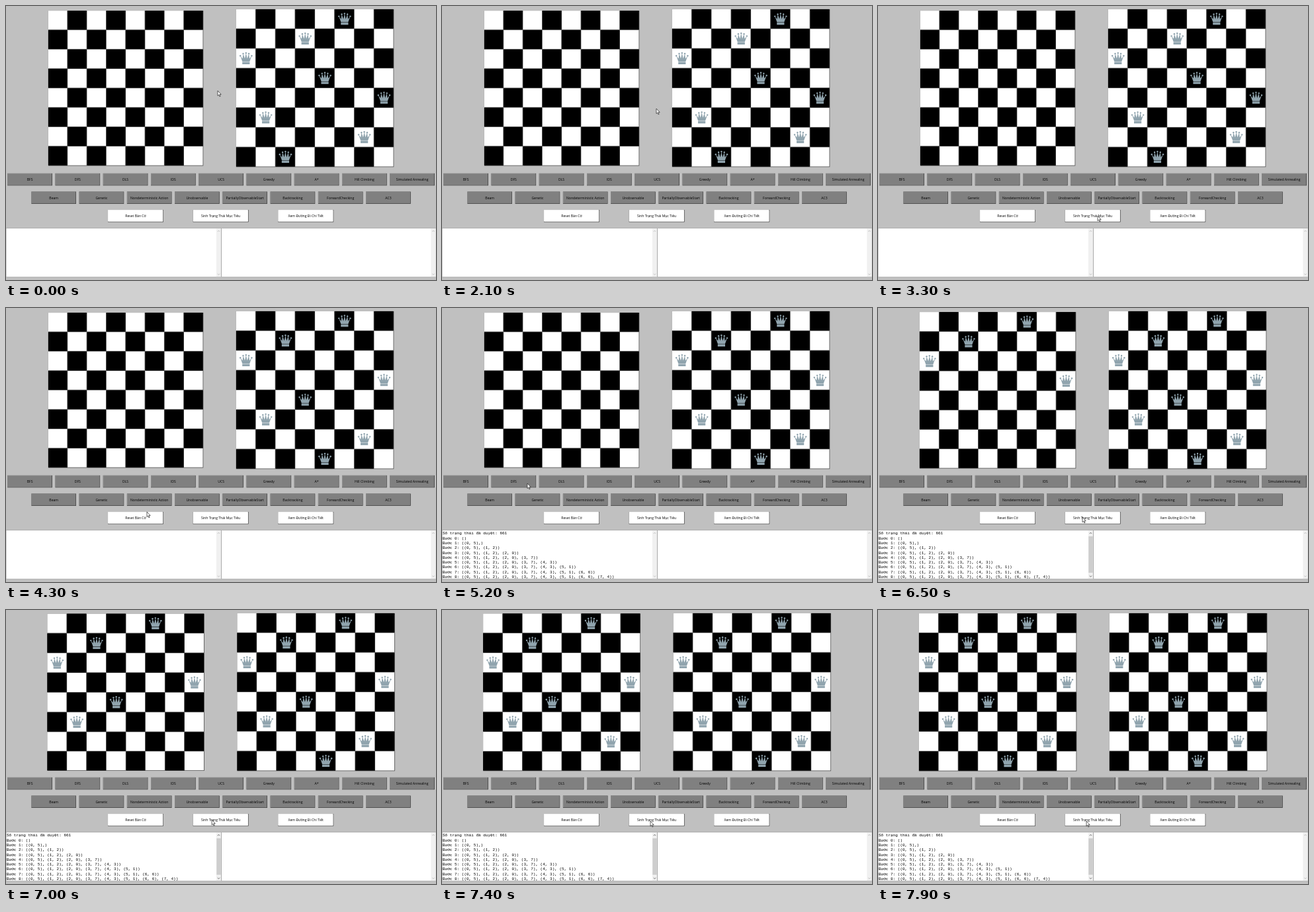
Recreate the animation shown at these times as an HTML page. Size 650 by 414 pixels, loop 8000 ms.

```html
<!DOCTYPE html>
<html lang="vi">
<head>
<meta charset="utf-8">
<title>Eight queens</title>
<style>
html, body { margin: 0; width: 100%; height: 100%; overflow: hidden; background: #c0c0c0; }
svg { display: block; width: 100vw; height: 100vh; }
.label { font-family: "Open Sans", "Noto Sans", sans-serif; font-size: 5.1px; text-anchor: middle; }
.log { font-family: "Liberation Mono", monospace; font-size: 6px; white-space: pre; }
</style>
</head>
<body>
<svg id="stage" viewBox="0 0 650 414">
  <defs>
    <g id="queen" fill="#90a4ae"></g>
  </defs>
  <g id="ui"></g>
  <g id="boards"></g>
  <path id="cursor" d="M0 0V7.6L1.7 6.1L2.9 8.8L4.1 8.3L2.9 5.6H5.2Z" fill="#fff" stroke="#222" stroke-width=".7" stroke-linejoin="round"/>
</svg>
<script>
const NS = "http://www.w3.org/2000/svg";
const LOOP = 8000, STEP = 100;
const TARGET_AT = 3400, LOG_AT = 5200, FIRST_QUEEN = 5450, QUEEN_GAP = 310;
const BASE = 29.3, WIDE = 29.8, EDGE = .8;

// column of the queen in each row
const OLD = [..."53047162"].map(Number);
const SOLVED = [..."52073164"].map(Number);

// pointer moves: begin, end, x, y
const HOME = [320, 128];
const MOVES = [
  [300, 1100, 324, 138], [1300, 2100, 324, 155], [2100, 2500, 332, 317],
  [3700, 4300, 213, 308], [4500, 5100, 129, 265], [5400, 6000, 309, 316],
  [6800, 7300, 315, 319]
];

const $ = id => document.getElementById(id);

function set(node, attrs) {
  for (const k in attrs) node.setAttribute(k, attrs[k]);
}

function el(parent, tag, attrs, text) {
  const node = document.createElementNS(NS, tag);
  set(node, attrs);
  if (text !== undefined) node.textContent = text;
  return parent.appendChild(node);
}

const rect = (parent, x, y, width, height, fill) => el(parent, "rect", { x, y, width, height, fill });
const show = (node, on) => node.setAttribute("visibility", on ? "visible" : "hidden");

function buildQueen() {
  const q = $("queen");
  let crown = "M-5.4 4.8";
  for (let i = -2; i <= 2; i++) {
    const x = i * 4.3, y = -8.4 + i * i * 1.05;
    el(q, "circle", { cx: x, cy: y, r: 1.2 });
    crown += `L${x} ${y}`;
    if (i < 2) crown += `L${(i + .5) * 3.5} 0`;
  }
  el(q, "path", { d: crown + "L5.4 4.8Z" });
  rect(q, -5.6, 5.3, 11.2, 3.3);
}

function button(x, y, w, h, text, fill, light, dark) {
  const ui = $("ui");
  rect(ui, x, y, w, h, dark);
  rect(ui, x, y, w - EDGE, h - EDGE, light);
  rect(ui, x + .6, y + .6, w - .6 - EDGE, h - .6 - EDGE, fill);
  el(ui, "text", { x: x + w / 2, y: y + h / 2 + 1.8, class: "label" }, text);
}

function pane(x, w) {
  const ui = $("ui");
  const bar = x + w - 4;
  rect(ui, x, 335.5, w, 74, "#a0a0a0");
  rect(ui, x + .5, 336.1, w - 1, 73, "#fff");
  rect(ui, bar - 3.6, 336.1, 7.1, 73, "#f0f0f0");
  const thumb = rect(ui, bar - 3.2, 345, 6.3, 55, "#cdcdcd");
  const arrows = el(ui, "path", {
    d: `M${bar - 1.7} 341l1.7-1.7l1.7 1.7M${bar - 1.7} 404.5l1.7 1.7l1.7-1.7`,
    fill: "none", "stroke-width": .8
  });
  return active => {
    show(thumb, active);
    arrows.setAttribute("stroke", active ? "#505050" : "#b8b8b8");
  };
}

function buildUi() {
  const grey = ["#808080", "#949494", "#383838"];
  const white = ["#fff", "#f0f0f0", "#383838"];
  const row = (names, x, y, w, pitch, colors) =>
    names.forEach((n, i) => button(x + i * pitch, y, w, 18.4, n, ...colors));
  row(["BFS", "DFS", "DLS", "IDS", "UCS", "Greedy", "A*", "Hill Climbing", "Simulated Annealing"],
    2.3, 252.9, 67.6, 72.25, grey);
  row(["Beam", "Genetic", "Nondeterministic Action", "Unobservable", "PartiallyObservableStart",
    "Backtracking", "ForwardChecking", "AC3"], 38.4, 280.5, 67.6, 72.25, grey);
  row(["Reset Bàn Cờ", "Sinh Trạng Thái Mục Tiêu", "Xem Đường Đi Chi Tiết"],
    154, 308, 84, 128.6, white);
}

function buildLog() {
  const log = el($("ui"), "g", { class: "log" });
  const lines = ["Số trạng thái đã duyệt: 661"];
  for (let n = 0; n <= 8; n++) {
    const pairs = SOLVED.slice(0, n).map((col, r) => `(${r}, ${col})`).join(", ");
    lines.push(`Bước ${n}: (${pairs}${n === 1 ? "," : ""})`);
  }
  lines.forEach((s, i) => el(log, "text", { x: 1, y: 342.3 + i * 7.3 }, s));
  return log;
}

function makeBoard() {
  const g = el($("boards"), "g", {});
  const cells = [], queens = [];
  for (let i = 0; i < 64; i++) {
    const black = ((i >> 3) + i) % 2;
    cells.push({
      edge: el(g, "rect", { fill: black ? "#404040" : "#505050" }),
      face: el(g, "rect", { fill: black ? "#000" : "#fff" })
    });
  }
  for (let r = 0; r < 8; r++) queens.push(el(g, "use", { href: "#queen" }));
  return { cells, queens };
}

// A row or column that holds a queen is slightly wider.
function edges(start, wide) {
  const out = [start];
  for (let i = 0; i < 8; i++) out.push(out[i] + (wide(i) ? WIDE : BASE));
  return out;
}

function drawBoard(board, cx, cy, cols, count) {
  const half = (8 * BASE + count * (WIDE - BASE)) / 2;
  const xs = edges(cx - half, c => cols.indexOf(c) < count);
  const ys = edges(cy - half, r => r < count);
  board.cells.forEach(({ edge, face }, i) => {
    const c = i & 7, r = i >> 3;
    const x = xs[c], y = ys[r], width = xs[c + 1] - x, height = ys[r + 1] - y;
    set(edge, { x, y, width, height });
    set(face, { x, y, width: width - EDGE, height: height - EDGE });
  });
  board.queens.forEach((q, r) => {
    const c = cols[r];
    show(q, r < count);
    set(q, { transform: `translate(${(xs[c] + xs[c + 1]) / 2} ${(ys[r] + ys[r + 1]) / 2})` });
  });
}

function pointer(t) {
  let [x, y] = HOME;
  for (const [begin, end, tx, ty] of MOVES) {
    const k = Math.max(0, Math.min(1, (t - begin) / (end - begin)));
    const e = k * k * (3 - 2 * k);
    x += (tx - x) * e;
    y += (ty - y) * e;
  }
  return [x, y];
}

buildQueen();
buildUi();
const leftBar = pane(0, 325.5), rightBar = pane(325.5, 324.5);
rightBar(false);
const log = buildLog();
const left = makeBoard(), right = makeBoard();

function draw(time) {
  const t = Math.floor((time % LOOP) / STEP) * STEP;
  const count = Math.max(0, Math.min(8, Math.floor((t - FIRST_QUEEN) / QUEEN_GAP) + 1));
  drawBoard(left, 181.1, 124.3, SOLVED, count);
  drawBoard(right, 467.1 + count * .25, 124.1, t < TARGET_AT ? OLD : SOLVED, 8);
  show(log, t >= LOG_AT);
  leftBar(count > 0);
  set($("cursor"), { transform: `translate(${pointer(t)})` });
}

const start = performance.now();
function tick() {
  draw(performance.now() - start);
  requestAnimationFrame(tick);
}
tick();
</script>
</body>
</html>
```
